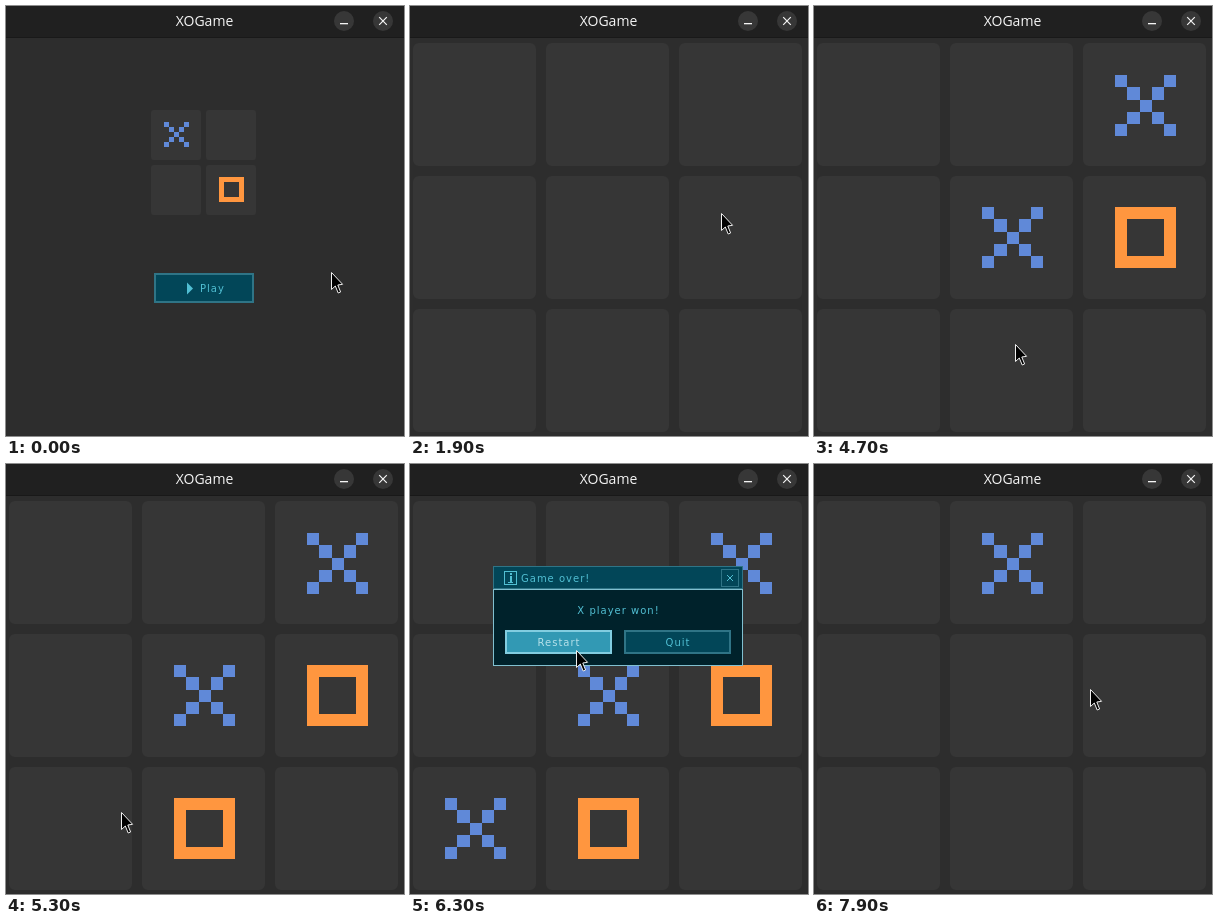
These frames come from a looping animation (398 px wide and 430 px high, 8000 ms). An HTML page with a canvas:

```html
<!DOCTYPE html>
<html lang="en">
<head>
<meta charset="utf-8">
<title>XOGame</title>
<style>
html, body { margin: 0; height: 100%; overflow: hidden; background: #2d2d2d; }
canvas { display: block; }
</style>
</head>
<body>
<canvas id="stage" width="398" height="430"></canvas>
<script>
const ctx = document.getElementById('stage').getContext('2d');
const LOOP = 8000, STEP = 100;
const MENU_END = 1200, GAME_OVER = 5500, RESET = 6700;
const PITCH = 133;
const NORMAL = { line: '#2f7486', base: '#024658', text: '#51bfd3' };
const FOCUS = { line: '#82cde0', base: '#3299b4', text: '#b6e1ea' };

// Pointer strokes: start, end, x and y reached; it rests in between
const home = [325, 266];
const strokes = [
  [0, 700, 227, 282],
  [1400, 1900, 311, 207],
  [1900, 2200, 380, 92],
  [2200, 2500, 337, 135],
  [2500, 3200, 321, 228],
  [3200, 3400, 191, 224],
  [3400, 3700, 178, 218],
  [4100, 4400, 192, 304],
  [4500, 4700, 201, 338],
  [4800, 5500, 94, 351],
  [5600, 6400, 169, 179],
  [6900, 7200, 217, 121],
  [7200, 7400, 204, 141],
  [7400, 7900, 276, 225]
];

// Clicks of each round; X and O take turns on the tile under the pointer
const rounds = [
  { end: RESET, clicks: [2600, 3100, 4100, 4900, GAME_OVER] },
  { end: LOOP, clicks: [7500] }
];

function pointerAt(t) {
  let [x, y] = home;
  for (const [start, end, toX, toY] of strokes) {
    const k = Math.min(1, Math.max(0, (t - start) / (end - start)));
    const ease = k * k * (3 - 2 * k);
    x += (toX - x) * ease;
    y += (toY - y) * ease;
  }
  return [Math.round(x), Math.round(y)];
}

function rect(x, y, w, h, color) {
  ctx.fillStyle = color;
  ctx.fillRect(x, y, w, h);
}

function frame(x, y, w, h, b, line, base) {
  rect(x, y, w, h, line);
  rect(x + b, y + b, w - 2 * b, h - 2 * b, base);
}

function tiles(n, x, y, size, pitch, r) {
  ctx.fillStyle = '#363636';
  ctx.beginPath();
  for (let i = 0; i < n * n; i++)
    ctx.roundRect(x + i % n * pitch, y + Math.floor(i / n) * pitch, size, size, r);
  ctx.fill();
}

function cross(x, y, r, color, width) {
  ctx.strokeStyle = color;
  ctx.lineWidth = width;
  ctx.beginPath();
  for (const s of [-r, r]) {
    ctx.moveTo(x - r, y - s);
    ctx.lineTo(x + r, y + s);
  }
  ctx.stroke();
}

function text(str, x, y, color, align = 'left') {
  ctx.font = '10px "DejaVu Sans", sans-serif';
  ctx.letterSpacing = '1px';
  ctx.textAlign = align;
  ctx.fillStyle = color;
  ctx.fillText(str, x, y);
}

// Marks live on a 5 by 5 grid of square pixels
function mark(kind, x, y, pixel) {
  const at = i => Math.round(i * pixel);
  ctx.fillStyle = kind === 'X' ? '#6089d8' : '#ff963f';
  for (let r = 0; r < 5; r++) for (let c = 0; c < 5; c++) {
    const on = kind === 'X' ? r === c || r + c === 4 : r % 4 === 0 || c % 4 === 0;
    if (on) ctx.fillRect(x + at(c), y + at(r), at(c + 1) - at(c), at(r + 1) - at(r));
  }
}

function button(x, y, w, h, [px, py], label) {
  const over = px >= x && px < x + w && py >= y && py < y + h;
  const style = over ? FOCUS : NORMAL;
  frame(x, y, w, h, 2, style.line, style.base);
  if (label) text(label, x + w / 2 + 0.5, y + 16, style.text, 'center');
  return style.text;
}

function titleBar() {
  rect(0, 0, 398, 31, '#202020');
  rect(0, 31, 398, 1, '#191919');
  ctx.font = '500 14px Ubuntu, "Open Sans", sans-serif';
  ctx.letterSpacing = '0px';
  ctx.textAlign = 'center';
  ctx.fillStyle = '#f4f4f4';
  ctx.fillText('XOGame', 198.5, 20);
  ctx.fillStyle = '#373737';
  for (const x of [338, 377]) {
    ctx.beginPath();
    ctx.arc(x, 15, 10, 0, 7);
    ctx.fill();
  }
  rect(334, 17, 8, 1.3, '#f4f4f4');
  cross(377, 15, 3.8, '#f4f4f4', 1.2);
}

function menu(pointer) {
  tiles(2, 145, 104, 50, 55, 3);
  mark('X', 158, 116, 5);
  mark('O', 213, 171, 5);
  const color = button(148, 267, 100, 30, pointer);
  text('Play', 194, 286, color);
  ctx.beginPath();
  ctx.moveTo(181, 276.5);
  ctx.lineTo(187, 282.5);
  ctx.lineTo(181, 288.5);
  ctx.fill();
}

function board(t) {
  tiles(3, 3, 37, 123, PITCH, 6);
  for (const { end, clicks } of rounds) clicks.forEach((click, turn) => {
    if (t < click || t >= end) return;
    const [x, y] = pointerAt(click);
    const col = Math.floor(x / PITCH), row = Math.floor((y - 32) / PITCH);
    mark('XO'[turn % 2], 35 + col * PITCH, Math.floor(69 + row * 132.5), 12.25);
  });
}

function dialog(pointer) {
  const { line, base, text: ink } = NORMAL;
  frame(83, 102, 250, 100, 1, '#81c0d0', '#00222b');
  frame(83, 102, 250, 23, 1, line, base);
  rect(83, 125, 250, 1, '#81c0d0');
  frame(94, 107, 13, 14, 1, ink, base);
  rect(100, 109, 2, 2, ink);
  rect(100, 112, 2, 6, ink);
  rect(98, 118, 5, 1, ink);
  text('Game over!', 111, 118, ink);
  frame(311, 105, 18, 18, 1, line, base);
  cross(320, 114, 3, ink, 1);
  text('X player won!', 208.5, 150, ink, 'center');
  button(95, 166, 107, 24, pointer, 'Restart');
  button(214, 166, 107, 24, pointer, 'Quit');
}

const arrow = new Path2D('M.5 .5V17.5L4.3 14L7.2 21L9.6 20L6.8 13L11.6 12.3Z');

function drawPointer([x, y]) {
  ctx.save();
  ctx.translate(x, y);
  ctx.fillStyle = '#000';
  ctx.fill(arrow);
  ctx.strokeStyle = '#eee';
  ctx.lineWidth = 1;
  ctx.stroke(arrow);
  ctx.restore();
}

function draw(now) {
  const t = Math.floor(now % LOOP / STEP) * STEP;
  const pointer = pointerAt(t);
  rect(0, 0, 398, 430, '#2d2d2d');
  titleBar();
  if (t < MENU_END) menu(pointer);
  else board(t);
  if (t >= GAME_OVER && t < RESET) dialog(pointer);
  drawPointer(pointer);
}

const began = performance.now();
function tick() {
  draw(performance.now() - began);
  requestAnimationFrame(tick);
}
tick();
</script>
</body>
</html>
```
